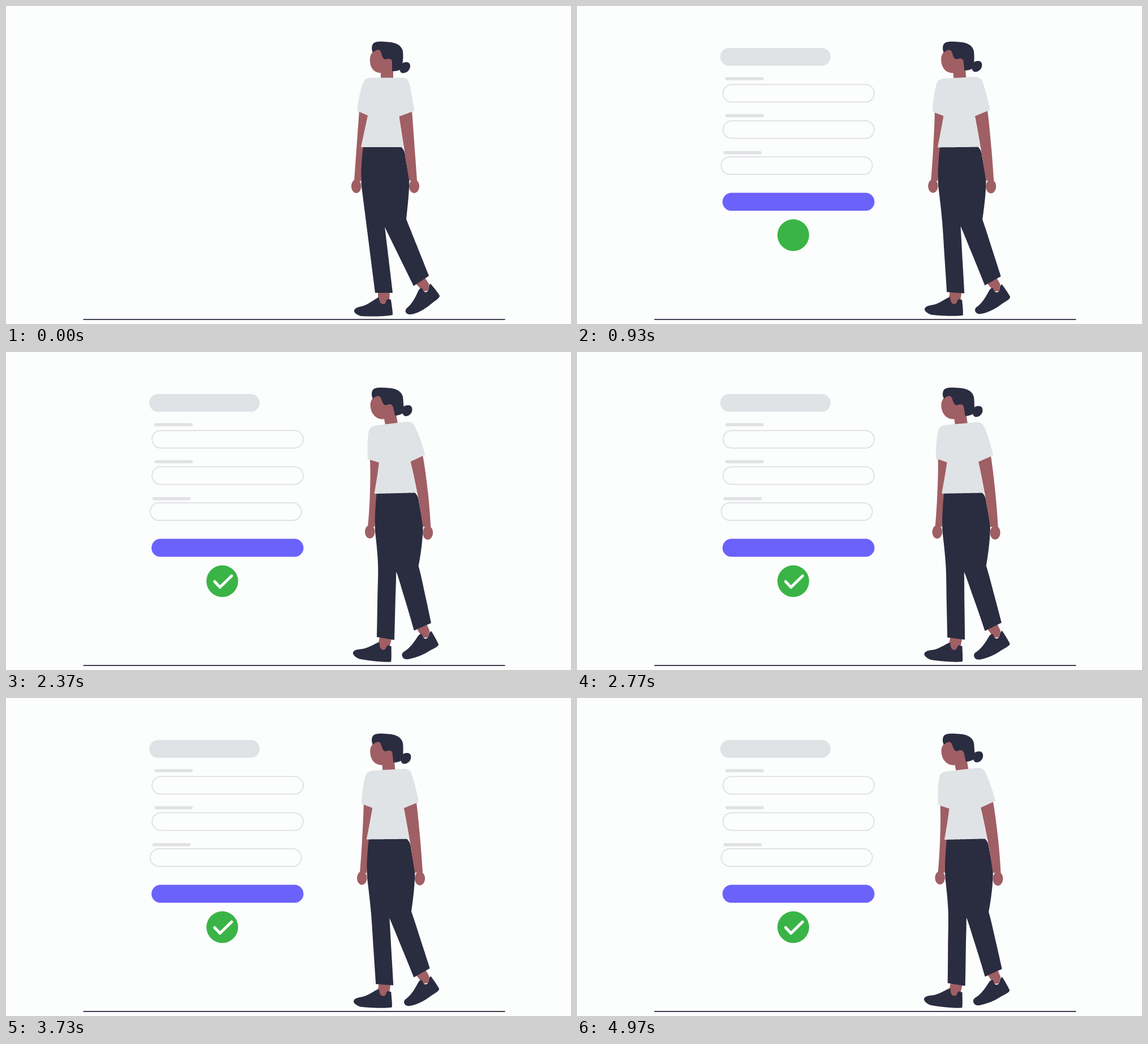
Recreate the animation shown at these times as an HTML page with a canvas. Size 998 by 561 pixels, loop 5.03 s.

```html
<!DOCTYPE html>
<html lang="en">
<head>
<meta charset="utf-8">
<title>Form and walker</title>
<style>
  html, body { margin: 0; width: 100%; height: 100%; overflow: hidden; background: #fcfdfd; }
  canvas { display: block; }
</style>
</head>
<body>
<canvas id="stage" width="998" height="561"></canvas>
<script>
const LOOP = 5030;
const ctx = document.getElementById('stage').getContext('2d');
const DARK = '#2a2c40', SKIN = '#9f5f64', SHIRT = '#e0e3e5', GREY = '#e1e2e5';

const clamp = v => Math.max(0, Math.min(1, v));
const ease = p => (1 - Math.cos(Math.PI * clamp(p))) / 2;
const mix = (a, b, p) => a + (b - a) * p;

// Smooth curve through [x, y] knots
function curve(knots) {
  const slope = i => {
    const a = knots[Math.max(0, i - 1)], b = knots[Math.min(knots.length - 1, i + 1)];
    return (b[1] - a[1]) / (b[0] - a[0]);
  };
  return x => {
    let i = 0;
    while (i < knots.length - 2 && x > knots[i + 1][0]) i++;
    const [x0, y0] = knots[i], [x1, y1] = knots[i + 1];
    const h = x1 - x0, u = clamp((x - x0) / h), v = 1 - u;
    return y0 * v * v * (1 + 2 * u) + y1 * u * u * (3 - 2 * u)
      + h * u * v * (slope(i) * v - slope(i + 1) * u);
  };
}

// Sideways lean at each height, for the body and for the rear leg
const upper = [[50, -1], [80, 0], [95, 1], [108, 3.8], [126, 8], [185, 19.5], [249, 24.3], [310, 25], [376, 22.3]];
const bodyLean = curve([...upper, [440, 13], [506, 3], [516, 1], [560, -5]]);
const rearLean = curve([...upper, [430, 13], [490, 1.5], [545, -7.5]]);
const bodyAxis = y => y < 120 ? 664 : 671;
const rearAxis = y => mix(672, 735, clamp((y - 330) / 146));

// Samples a path and stores how far each point moves at full lean
function part(color, d, rear) {
  const path = document.createElementNS('http://www.w3.org/2000/svg', 'path');
  path.setAttribute('d', d);
  const lean = rear ? rearLean : bodyLean, axis = rear ? rearAxis : bodyAxis;
  const length = path.getTotalLength(), points = [];
  for (let s = 0; s < length; s += 0.8) {
    const { x, y } = path.getPointAtLength(s);
    const turn = (lean(y + 4) - lean(y - 4)) / 8 * (y < 250 ? 0.6 : 1);
    points.push([x, y, lean(y), -turn * (x - axis(y))]);
  }
  return { color, points };
}

const person = [
  // far arm
  part(SKIN, 'M624 184L641 190L632 250L627 309L615 308Z'),
  part(SKIN, 'M610 318a8.7 12 0 1 1 17.4 0a8.7 12 0 1 1 -17.4 0Z'),
  // ankles and shoes
  part(SKIN, 'M657 503L678 503L677 522L666 529L657 520Z'),
  part(DARK, 'M615 537C617 531 626 531 634 528C643 524 650 518 658 514C660 520 660 526 667 526C673 525 670 517 675 517L680 518C681 527 683 536 683 545C670 548 640 548 627 547C620 545 614 541 615 537Z'),
  part(SKIN, 'M724 490L739 478L747 490L746 502L737 504Z', true),
  part(DARK, 'M735 498C738 506 742 506 745 503C748 499 745 492 750 490C755 496 761 503 766 511C766 516 757 520 748 528C738 536 722 545 712 544C705 543 704 537 708 533C718 525 724 512 728 503C730 499 732 497 735 498Z', true),
  // trousers
  part(DARK, 'M660 260L660 248L697 248C702 252 704 257 705 264L712 303C713 325 709 355 707 376L747 476L720 494L669 390Z', true),
  part(DARK, 'M631 248L697 248C702 252 704 257 705 264L690 389L669 389L683 506L652 506L628 318C626 290 629 265 631 248Z'),
  // near arm
  part(SKIN, 'M694 192L717 184L726 308L712 308Z'),
  part(SKIN, 'M712 318a9 12 0 1 1 18 0a9 12 0 1 1 -18 0Z'),
  // head, hair, shirt
  part(SKIN, 'M652 78C645 82 642 89 643 98C643.5 110 651 118 662 118L662 128L684 128L684 90L665 74Z'),
  part(DARK, 'M648 82C645 76 646 69 649 66C654 61 668 63 680 64C692 66 699 71 701 80C702 90 701 100 699 110C696 114 689 115 682 115L682 100C682 95 680 93 676 93C672 93 671 95 669 94C664 92 664 84 661 79C658 76 654 77 648 82Z'),
  part(DARK, 'M713.5 103C716 111 708 120 699 118C693 115 696 104 702 100C707 98 712 99 713.5 103Z'),
  part(SHIRT, 'M632 133C635 128 640 127 647 126.5L700 126.5C707 127 710 130 712 135C716 149 718 165 721.5 185L694 195L702.5 249L627 249L639 193L620 185C622 165 626 147 632 133Z')
];

// Sway stops: [time, lean in pixels]
const stops = [[0, 0], [2130, 25.2], [3450, 9], [5100, 22.5]];
function sway(t) {
  const i = stops.findIndex(s => t < s[0]);
  const [t0, a] = stops[i - 1], [t1, b] = stops[i];
  return mix(a, b, ease((t - t0) / (t1 - t0)));
}

function drawPerson(t) {
  const k = sway(t) / 24.7;
  for (const { color, points } of person) {
    ctx.fillStyle = color;
    ctx.beginPath();
    for (const [x, y, dx, dy] of points) ctx.lineTo(x + dx * k, y + dy * k);
    ctx.fill();
  }
}

function pill(x, y, w, h, color, outline) {
  ctx.beginPath();
  ctx.roundRect(x, y, w, h, h / 2);
  ctx.fillStyle = ctx.strokeStyle = color;
  ctx.lineWidth = 2;
  outline ? ctx.stroke() : ctx.fill();
}

// Form pieces in order of appearance
const form = [
  () => pill(253, 74, 195, 31.5, GREY),
  () => pill(262, 125.5, 68, 5.5, GREY),
  () => pill(258, 138.5, 267, 31, GREY, true),
  () => pill(262, 190.7, 68, 5.5, GREY),
  () => pill(258, 202.5, 267, 31, GREY, true),
  () => pill(258.5, 256, 68, 5.5, GREY),
  () => pill(254.7, 266, 267, 31, GREY, true),
  () => pill(257, 329.5, 268.5, 31.8, '#6b62fc')
];

function drawForm(t) {
  form.forEach((draw, i) => {
    ctx.globalAlpha = ease((t - 60 - i * 70) / 280);
    draw();
  });
  ctx.globalAlpha = 1;

  ctx.fillStyle = '#3ab446';
  ctx.beginPath();
  ctx.arc(382, 404.3, 28 * ease((t - 600) / 300), 0, 7);
  ctx.fill();

  const tick = ease((t - 1090) / 420);
  if (tick > 0) {
    const down = clamp(tick * 3), up = clamp(tick * 1.5 - 0.5);
    ctx.strokeStyle = '#fcfdfd';
    ctx.lineWidth = 5;
    ctx.lineCap = ctx.lineJoin = 'round';
    ctx.beginPath();
    ctx.moveTo(368.5, 405);
    ctx.lineTo(368.5 + 9.5 * down, 405 + 10 * down);
    if (up > 0) ctx.lineTo(378 + 20.5 * up, 415 - 20 * up);
    ctx.stroke();
  }
}

function frame() {
  const t = performance.now() % LOOP;
  ctx.clearRect(0, 0, 998, 561);
  ctx.fillStyle = '#403f50';
  ctx.fillRect(136.5, 552, 745, 2);
  drawForm(t);
  drawPerson(t);
  requestAnimationFrame(frame);
}
frame();
</script>
</body>
</html>
```
